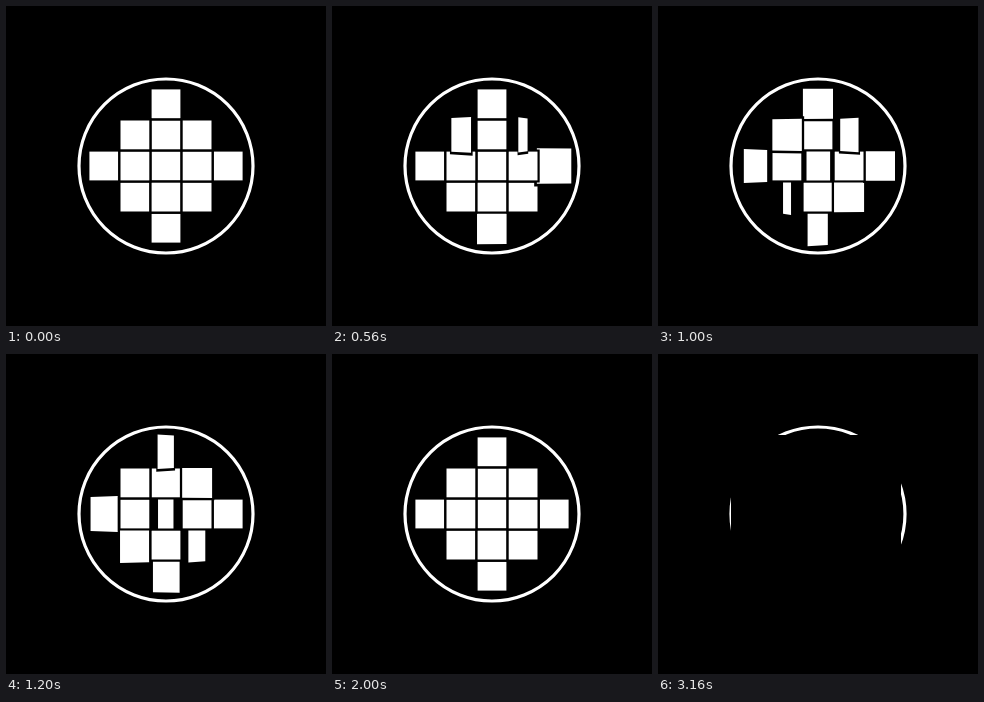
An HTML page with a canvas that plays this animation: 320x320 px, repeating every 3.28 s.

```html
<!DOCTYPE html>
<html lang="en">
<head>
<meta charset="utf-8">
<title>Flipping tiles</title>
<style>
html, body { margin: 0; width: 100%; height: 100%; overflow: hidden; background: #000; }
canvas { display: block; width: 100vmin; height: 100vmin; margin: auto; }
</style>
</head>
<body>
<canvas width="320" height="320"></canvas>
<script>
const canvas = document.querySelector('canvas');
const ctx = canvas.getContext('2d');
const ratio = window.devicePixelRatio || 1;
canvas.width = canvas.height = 320 * ratio;
ctx.scale(ratio, ratio);

const LOOP = 3280, STEP = 40, BLANK_AT = 3160;
const FLIP = 1000, LIFT = 0.22, DEPTH = 400;
const PITCH = 31.1, HALF = 14.4, GAP = 2.2;

// [column, row, flip start], painted from back to front; no start means still
const tiles = [
  [0, 0, 585], [0, 2, 402],
  [-1, 1, 640], [0, 1], [1, 1, 933],
  [-2, 0, 770], [2, 0, 40], [-1, 0], [1, 0],
  [0, -1], [0, -2, 930],
  [-1, -1, 160], [1, -1, 260]
];

// Square turned about its vertical axis, seen in slight perspective
function panel(cx, cy, half, angle, scale, color) {
  const edge = side => {
    const near = scale / (1 + side * half * Math.sin(angle) / DEPTH);
    return [cx + side * half * Math.cos(angle) * near, half * near];
  };
  const [x0, h0] = edge(-1);
  const [x1, h1] = edge(1);
  ctx.fillStyle = color;
  ctx.beginPath();
  ctx.moveTo(x0, cy - h0);
  ctx.lineTo(x1, cy - h1);
  ctx.lineTo(x1, cy + h1);
  ctx.lineTo(x0, cy + h0);
  ctx.fill();
}

function drawTile([col, row, start = LOOP], t) {
  const p = Math.min(1, Math.max(0, (t - start) / FLIP));
  const angle = Math.PI * (1 - Math.cos(Math.PI * p));
  const scale = 1 + LIFT * Math.sin(Math.PI * p);
  const cx = 160 + col * PITCH, cy = 160 + row * PITCH;
  panel(cx, cy, HALF + GAP, angle, scale, '#000');
  panel(cx, cy, HALF, angle, scale, '#fff');
}

function draw(t) {
  ctx.fillStyle = '#000';
  ctx.fillRect(0, 0, 320, 320);
  ctx.strokeStyle = '#fff';
  ctx.lineWidth = 3.2;
  ctx.beginPath();
  ctx.arc(160, 160, 87, 0, 2 * Math.PI);
  ctx.stroke();
  if (t >= BLANK_AT) {
    ctx.fillStyle = '#000';
    ctx.fillRect(73, 81, 170, 168);
  } else {
    tiles.forEach(tile => drawTile(tile, t));
  }
}

const begin = performance.now();
function tick() {
  const t = (performance.now() - begin) % LOOP;
  draw(Math.floor(t / STEP) * STEP);
  requestAnimationFrame(tick);
}
tick();
</script>
</body>
</html>
```
